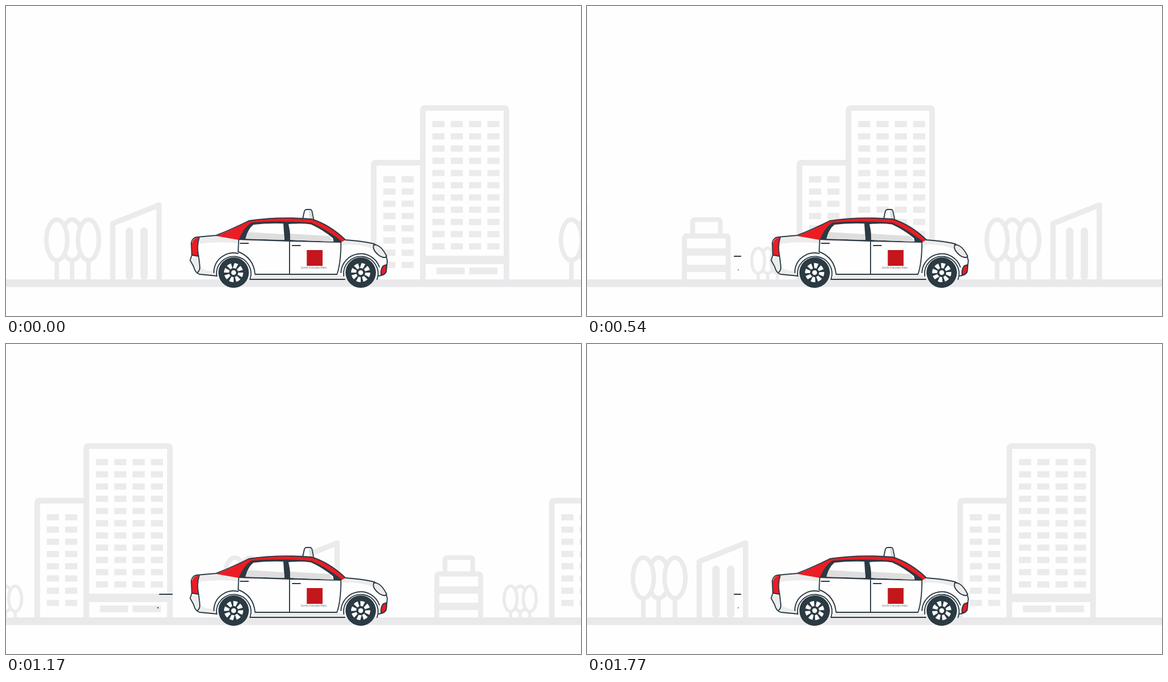
An HTML page for the animation above (1.8 s loop, 1018 px wide and 550 px high).

```html
<!DOCTYPE html>
<html lang="en">
<head>
<meta charset="utf-8">
<title>Taxi ride</title>
<style>
  html, body { margin: 0; width: 100%; height: 100%; overflow: hidden; background: #fefefe; }
  svg { display: block; width: 1018px; height: 550px; }
  .town { fill: #fefefe; stroke: #ebebec; stroke-linejoin: round; }
  .town .solid { fill: #ebebec; stroke: none; }
  .line { fill: none; stroke: #2b3a43; stroke-width: 1.9; stroke-linecap: round; stroke-linejoin: round; }
  .white { fill: #fefefe; }
  .grey { fill: #dededf; }
  .pale { fill: #ececed; }
  .red { fill: #ec1c24; }
  .dark { fill: #2b3a43; }
  .tag { font: italic 5px Lato, "Open Sans", sans-serif; fill: #77777a; }
</style>
</head>
<body>
<svg viewBox="0 0 1018 550">
  <defs>
    <g id="block" class="town"></g>
    <g id="wheel">
      <circle class="dark" r="27"/>
      <circle r="12.5" fill="none" stroke="#fefefe" stroke-width="9" pathLength="80" stroke-dasharray="6.4 3.6"/>
      <circle class="white" r="4.3"/>
    </g>
  </defs>

  <g id="town">
    <use href="#block"/>
    <use href="#block" x="911"/>
  </g>
  <rect y="485" width="1018" height="13.5" fill="#e9e9eb"/>
  <g id="wind" class="dark"></g>

  <g id="car">
    <path class="white line" d="M525 379L528 365Q529 361 533 361H538Q541 361 542 365L545 381Z"/>
    <path class="grey" d="M536 363H538.5Q540.5 363 541 366L543.5 378H538Z"/>

    <path class="white" d="M338 410L372 407Q400 396 430 381Q482 373 541 378Q573 388 601 415Q632 417 652 422Q673 436 675 452L673 472Q669 479 657 479L600 485H432L374 479L343 476Q335 474 332 462L326 451L329 442L328 420Q330 411 338 410Z"/>
    <path class="pale" d="M342 411L372 408L413 415L412 421Q375 417 341 422Z"/>
    <path class="pale" d="M596 419L602 415Q632 417 652 423L652 432Q626 421 596 424Z"/>
    <path class="pale" d="M327 447L341 444L343 461Q347 470 374 471L373 479L343 476Q335 474 332 462Z"/>
    <path class="pale" d="M440 477H587L600 479V485H432Z"/>
    <path class="red" d="M372 408Q400 397 430 381Q482 373 541 378Q573 388 601 415L594 419L412 415Z"/>

    <path class="dark" d="M412 415Q420 394 434 384.5Q480 380 541 384.5Q567 396 594 417V420L503 418Z"/>
    <path class="white" d="M424 413Q428 396 438 388Q463 385 491 386L493 415Z"/>
    <path class="grey" d="M428 401L492 405L493 415L424 413Z"/>
    <path class="white" d="M500 387Q522 385 540 387.5Q561 397 579 412L580 418L503 415Q504 403 500 387Z"/>
    <path class="grey" d="M504 404L572 408L580 418L503 415Z"/>

    <path class="red" d="M338 411Q328 414 328 430L329 442L341 444Q337 427 342 411Z"/>
    <path class="line" d="M342 411Q337 427 341 444L343 461Q344 469 339 473M329 442L341 444"/>
    <path class="line" d="M374 479L343 476Q335 474 332 462L326 451L329 442L328 420Q330 411 338 410L372 407Q400 396 430 381Q482 373 541 378Q573 388 601 415Q632 417 652 422Q673 436 675 452L673 472Q669 479 657 479"/>
    <path class="line" d="M412 415L411 436Q438 446 441 476H586Q593 456 593 419M502 417V476M415 421H429M507 425H521M432 485H600"/>

    <path class="line pale" d="M651 424Q663 422 674 444Q671 449 661 443Q648 433 651 424Z"/>
    <path class="line red" d="M664 477Q663 466 668 461L674 459L673 471Q671 477 664 477Z"/>

    <path class="line white" id="arch" d="M373 479A30.5 30.5 0 1 1 432 485"/>
    <use href="#arch" x="225"/>
    <path class="line" d="M368 473A35 35 0 0 1 411 439M593 473A35 35 0 0 1 661 463"/>

    <rect x="532.5" y="433" width="28" height="28" fill="#c4161c"/>
    <text class="tag" x="522" y="466">Gentle Everyday Rides</text>

    <g transform="translate(403 473)"><use href="#wheel" class="spin"/></g>
    <g transform="translate(628 473)"><use href="#wheel" class="spin"/></g>
  </g>
</svg>

<script>
  const LOOP = 1800, STEP = 30, SPEED = 916.5 / LOOP, TURN = 1935 / LOOP;
  const $ = (q) => document.querySelector(q);

  function add(parent, tag, attrs) {
    const el = document.createElementNS("http://www.w3.org/2000/svg", tag);
    for (const k in attrs) el.setAttribute(k, attrs[k]);
    return parent.appendChild(el);
  }

  const block = $("#block");
  const path = (d, w) => add(block, "path", { d, "stroke-width": w });
  const bar = (x, y, width, height, rx = 0) =>
    add(block, "rect", { x, y, width, height, rx, class: "solid" });

  // Middle tree stands behind its neighbours.
  function trees(xs, cy, rx, ry, w) {
    for (const i of [1, 0, 2]) {
      add(block, "ellipse", { cx: xs[i], cy, rx, ry, "stroke-width": w });
      path(`M${xs[i]} ${cy + ry}V486`, w);
    }
  }

  function windows(x, y, cols, rows) {
    for (let c = 0; c < cols; c++)
      for (let r = 0; r < rows; r++) bar(x + c * 32.4, y + r * 21.7, 21.5, 11);
  }

  trees([90, 117, 146], 415, 18.5, 36, 8);

  path("M189 486V386L271 353V486", 9.5);
  bar(212, 393, 13, 93, 6.5);
  bar(238, 393, 13, 93, 6.5);

  path("M462 408V383Q462 379 466 379H507Q511 379 511 383V408", 8.5);
  path("M447.5 486V412Q447.5 408 451.5 408H521Q525 408 525 412V486", 9);
  bar(447, 430, 78, 13);
  bar(447, 459, 78, 13);

  trees([578, 595, 612], 452, 11.5, 22.5, 5.5);

  path("M651 486V282Q651 278 655 278H738V486", 10);
  windows(668, 302, 2, 8);
  path("M738 486V185Q738 181 742 181H882Q886 181 886 185V486", 10);
  windows(755, 204, 4, 11);
  bar(738, 443, 148, 15);
  bar(762, 464, 50, 12);
  bar(820, 464, 50, 12);

  // Each gust row: y, then [time, left, right] relative to the gust.
  const gusts = [210, 900, 1440];
  const rows = [
    [425, [[-70, 320, 320], [0, 292, 312], [60, 282, 300], [90, 282, 300], [220, 268, 268]]],
    [444, [[0, 320, 320], [30, 313, 319], [60, 305, 313], [90, 292, 309], [270, 271, 295], [330, 260, 273], [360, 257, 257]]],
    [468, [[-60, 322, 322], [0, 296, 318], [60, 287, 303], [90, 286, 303], [240, 268, 271], [345, 267, 268]]]
  ];
  const streaks = rows.map(([y]) => add($("#wind"), "rect", { y: y - 1, height: 2, rx: 0.6 }));

  function span(keys, p) {
    const i = keys.findIndex((k) => k[0] > p);
    if (i < 1) return null;
    const a = keys[i - 1], b = keys[i], f = (p - a[0]) / (b[0] - a[0]);
    return [1, 2].map((n) => a[n] + (b[n] - a[n]) * f);
  }

  const spins = document.querySelectorAll(".spin");

  function draw(t) {
    $("#town").setAttribute("transform", `translate(${-t * SPEED} 0)`);
    spins.forEach((s) => s.setAttribute("transform", `rotate(${t * TURN})`));
    rows.forEach(([, keys], i) => {
      const hit = gusts.map((g) => span(keys, t - g)).find(Boolean) || [0, 0];
      streaks[i].setAttribute("x", hit[0]);
      streaks[i].setAttribute("width", hit[1] - hit[0]);
    });
  }

  const start = performance.now();
  function tick() {
    const t = Math.max(0, performance.now() - start) + 3;
    draw(Math.floor((t % LOOP) / STEP) * STEP);
    requestAnimationFrame(tick);
  }
  tick();
</script>
</body>
</html>
```
